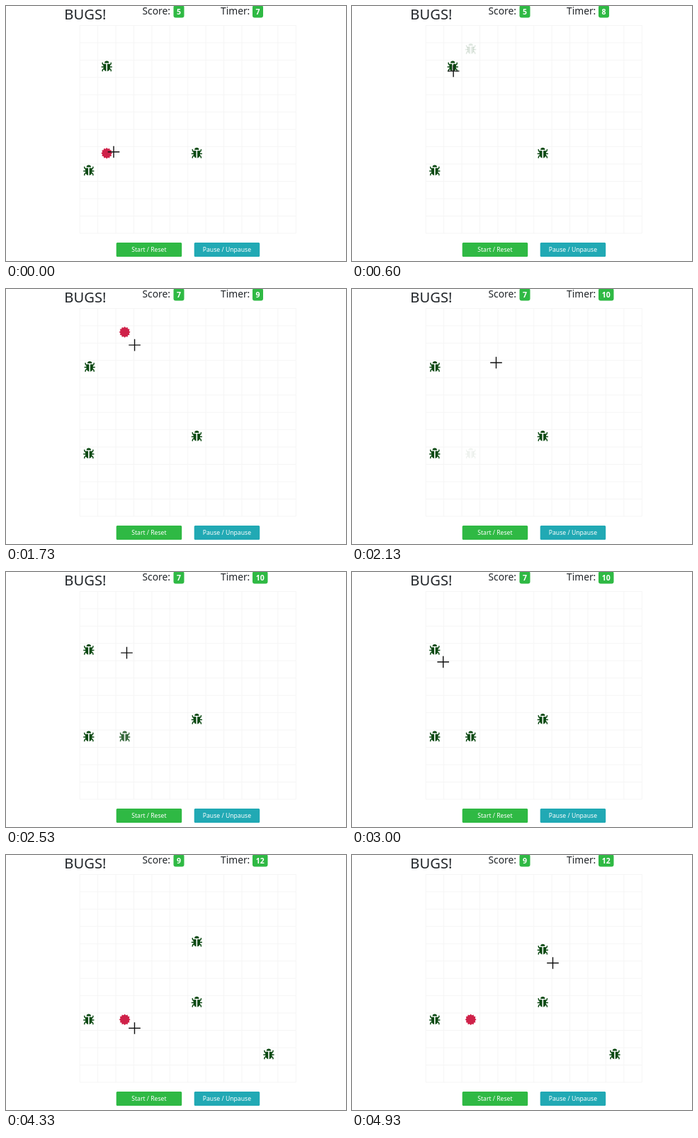
An HTML page with a canvas that plays this animation: 480x360 px, repeating every 4.99 s.

```html
<!DOCTYPE html>
<html lang="en">
<head>
<meta charset="utf-8">
<title>Bugs</title>
<style>
  html, body { margin: 0; width: 100%; height: 100%; overflow: hidden; background: #fff; }
  canvas { display: block; width: 480px; height: 360px; }
</style>
</head>
<body>
<canvas id="stage"></canvas>
<script>
const LOOP = 4990, FADE = 530, GLIDE = 215;
const TICK = 1025, FIRST_TICK = 75;
const CELL_W = 25.42, CELL_H = 24.5;
const FONT = '"Noto Sans", "Open Sans", sans-serif';
const GREEN = '#2fb944', TEAL = '#21a9b4', BUG = '#0d4a14', SPLAT = '#cf2149', INK = '#212529';

const canvas = document.getElementById('stage');
const ratio = window.devicePixelRatio || 1;
canvas.width = 480 * ratio;
canvas.height = 360 * ratio;
const ctx = canvas.getContext('2d');
ctx.scale(ratio, ratio);

// A bug lives in a cell until it is hit; its splat stays until it is reborn.
// step: the cell offset it crosses, starting at timer tick number `tick`.
const bugs = [
  [{ col: 0, row: 8 }],
  [{ col: 6, row: 7 }],
  [{ col: 1, row: 2, end: 730 },
   { col: 1, row: 3, born: 1137, end: 3070, step: [-1, 0], tick: 1 },
   { col: 9, row: 10, born: 3130, step: [1, 0], tick: 3 }],
  [{ col: 1, row: 7, end: 0 },
   { col: 2, row: 1, born: 530, end: 1470 },
   { col: 2, row: 8, born: 2100, end: 4200 }],
  [{ col: 6, row: 3, born: 3740, step: [0, 1], tick: 4 }]
];

// Time, x, y of the places where the pointer turns
const turns = [
  [0, 152, 206], [650, 143, 90], [1270, 168, 80], [1470, 170, 66], [2130, 203.5, 104],
  [3000, 128.7, 127], [3530, 144.5, 150], [4330, 181.5, 244.5], [4800, 283.5, 152.5]
];

function pointer(t) {
  const i = turns.findIndex(p => p[0] > t);
  if (i < 0) return turns[turns.length - 1].slice(1);
  const [t0, x0, y0] = turns[i - 1], [t1, x1, y1] = turns[i];
  const u = (t - t0) / (t1 - t0), k = u * u * (3 - 2 * u);
  return [x0 + (x1 - x0) * k, y0 + (y1 - y0) * k];
}

function place({ col, row, step = [0, 0], tick = 0 }, t) {
  const age = Math.max(0, t - FIRST_TICK - tick * TICK);
  const k = 1 - Math.exp(-age / GLIDE);
  return [116.8 + (col + step[0] * k) * CELL_W, 36 + (row + step[1] * k) * CELL_H];
}

function text(str, x, y, size, color, align = 'left', weight = 400) {
  ctx.font = `${weight} ${size}px ${FONT}`;
  ctx.textAlign = align;
  ctx.fillStyle = color;
  ctx.fillText(str, x, y);
}

function box(x, y, w, h, r, color) {
  ctx.fillStyle = color;
  ctx.beginPath();
  ctx.roundRect(x, y, w, h, r);
  ctx.fill();
}

function badge(x, value) {
  const w = value > 9 ? 21.5 : 15;
  box(x, -1, w, 17.5, 3, GREEN);
  text(value, x + w / 2, 12, 10.5, '#fff', 'center', 700);
}

function button(x, label, color) {
  box(x, 334, 92.5, 20, 1.5, color);
  text(label, x + 46.2, 347.2, 8.65, '#fff', 'center');
}

function grid() {
  ctx.strokeStyle = '#f5f5f5';
  ctx.lineWidth = 1;
  ctx.beginPath();
  for (let i = 0; i <= 12; i++) {
    const x = 104.2 + i * CELL_W, y = 27.5 + i * 24.45;
    ctx.moveTo(x, 27);
    ctx.lineTo(x, 321);
    ctx.moveTo(104, y);
    ctx.lineTo(409, y);
  }
  ctx.stroke();
}

// One half of the bug, mirrored for the other; units are pixels
function bug(x, y, alpha) {
  ctx.save();
  ctx.globalAlpha = alpha;
  ctx.translate(x, y);
  ctx.fillStyle = ctx.strokeStyle = BUG;
  ctx.lineWidth = 1.5;
  ctx.lineJoin = 'round';
  ctx.beginPath();
  ctx.arc(0, -4.4, 3.2, Math.PI, 0);
  ctx.fill();
  for (const side of [1, -1]) {
    ctx.save();
    ctx.scale(side, 1);
    ctx.beginPath();
    ctx.moveTo(0.8, -3.2);
    ctx.lineTo(4.3, -3.2);
    ctx.bezierCurveTo(5.2, 0, 5.2, 6.4, 0.8, 7.2);
    ctx.closePath();
    ctx.fill();
    ctx.beginPath();
    for (const dir of [-1, 1]) {
      ctx.moveTo(3.5, 1 + dir * 2.3);
      ctx.lineTo(5.6, 1 + dir * 3.6);
      ctx.lineTo(6.3, 1 + dir * 6.2);
    }
    ctx.moveTo(3.5, 1);
    ctx.lineTo(7.6, 1);
    ctx.stroke();
    ctx.restore();
  }
  ctx.restore();
}

function splat(x, y) {
  ctx.fillStyle = SPLAT;
  ctx.beginPath();
  for (let i = 0; i < 24; i++) {
    const a = i * Math.PI / 12, r = i % 2 ? 6.3 : 7.9;
    ctx.lineTo(x + r * Math.sin(a), y - r * Math.cos(a));
  }
  ctx.fill();
}

function cross(x, y) {
  ctx.strokeStyle = '#111';
  ctx.lineWidth = 1.4;
  ctx.beginPath();
  ctx.moveTo(x - 8.3, y);
  ctx.lineTo(x + 8.3, y);
  ctx.moveTo(x, y - 8.3);
  ctx.lineTo(x, y + 8.3);
  ctx.stroke();
}

function draw(t) {
  ctx.fillStyle = '#fff';
  ctx.fillRect(0, 0, 480, 360);
  grid();

  const hits = bugs.flat().filter(life => t >= life.end).length;
  const ticks = Math.floor((t - FIRST_TICK) / TICK) + 1;
  text('BUGS!', 82.3, 19.3, 20.2, INK);
  text('Score:', 192.5, 12.2, 13.8, INK);
  text('Timer:', 303, 12.2, 13.8, INK);
  badge(236.5, 4 + hits);
  badge(348, 7 + ticks);
  button(155.7, 'Start / Reset', GREEN);
  button(265.7, 'Pause / Unpause', TEAL);

  for (const lives of bugs) {
    const life = lives.findLast(l => t >= (l.born ?? 0));
    if (!life) continue;
    const { born = -FADE, end = LOOP } = life;
    const [x, y] = place(life, Math.min(t, end));
    if (t >= end) splat(x, y + 0.3);
    else bug(x, y, Math.min(1, (t - born) / FADE));
  }
  cross(...pointer(t));
}

const start = performance.now();
function frame() {
  draw((performance.now() - start) % LOOP);
  requestAnimationFrame(frame);
}
frame();
</script>
</body>
</html>
```
